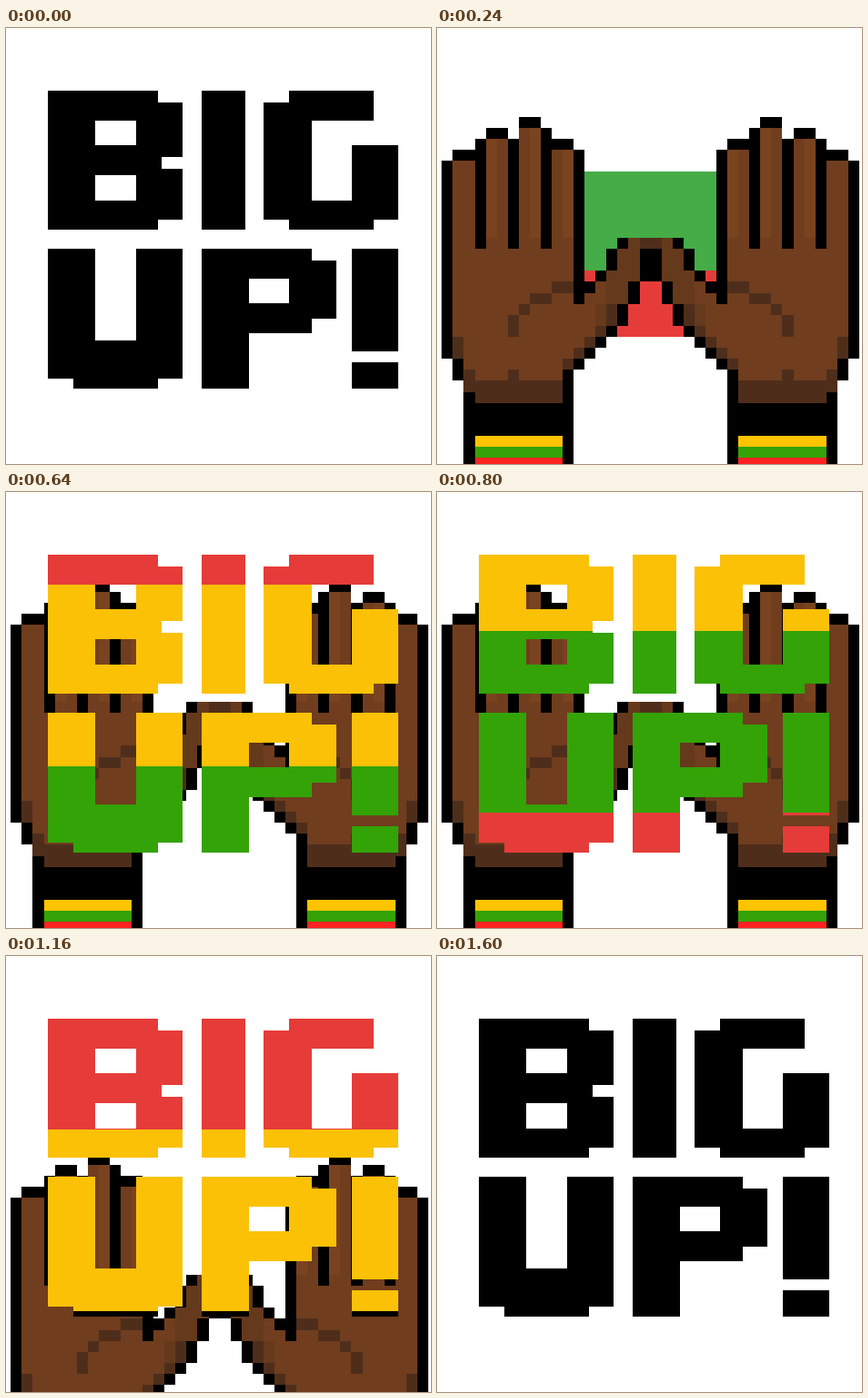
Animation of 467 by 480 pixels, one loop 1680 ms. Source, as an HTML page with a canvas:

```html
<!DOCTYPE html>
<html lang="en">
<head>
<meta charset="utf-8">
<title>Big up!</title>
<style>
  html, body { margin: 0; width: 100%; height: 100%; overflow: hidden; background: #fff; }
  canvas { display: block; }
</style>
</head>
<body>
<canvas id="stage" width="467" height="480"></canvas>
<script>
const ctx = document.getElementById('stage').getContext('2d');
const LOOP = 1680, W = 467, H = 480;

const BLACK = '#000', SKIN = '#703d1e', LIGHT = '#7a4320', MID = '#65391c', DARK = '#4e2e1b';
const YELLOW = '#fbc107', RED = '#e53c39', GREEN = '#33a307', SOFT_GREEN = '#45ac47';

// The picture holds for 80 ms, or 40 ms after the short steps
const SHORT = [0, 2, 7, 8, 13, 21];
const steps = [];
for (let t = 0, i = 0; t < LOOP; i++) {
  steps.push(t);
  t += SHORT.includes(i) ? 40 : 80;
}

// Value at t on the straight line through (t0, a) and (t1, b)
const line = (t, t0, a, t1, b) => Math.round(a + (b - a) * (t - t0) / (t1 - t0));

function stripeY(t) {
  if (t < 480) return line(t, 240, 467, 480, 261);
  if (t < 640) return line(t, 480, 261, 640, 102);
  if (t < 1000) return line(t, 640, 102, 1000, -233);
  return line(t, 1000, -233, 1320, -585);
}

function handsY(t) {
  return t < 240 ? line(t, 40, 240, 240, 0) : Math.max(0, line(t, 1080, 0, 1160, 120));
}

// A block with holes, each hole given relative to the block
function glyph(path, x, y, w, h, ...holes) {
  path.rect(x, y, w, h);
  for (const [dx, dy, hw, hh] of holes) path.rect(x + dx, y + dy, hw, hh);
}

// Corner notches of a full-width letter
const WIDE = 148, TALL = 153, CUT = 27;
const topLeft = [0, 0, CUT + 1, 13], topRight = [WIDE - CUT, 0, CUT, 13];
const lowLeft = [0, TALL - 11, CUT + 1, 11], lowRight = [WIDE - CUT, TALL - 11, CUT, 11];

function bigUp() {
  const p = new Path2D();
  glyph(p, 46, 69, WIDE, TALL, topRight, lowRight, [52, 33, 45, 27], [52, 93, 45, 28], [125, 73, 23, 13]);
  glyph(p, 215, 69, 48, TALL);
  glyph(p, 283, 69, WIDE, TALL, topLeft, topRight, lowLeft, lowRight,
    [53, 33, 44, 88], [97, 33, 51, 27], [121, 13, 27, 20]);
  glyph(p, 46, 244, WIDE, TALL, lowLeft, lowRight, [52, 0, 45, 100]);
  p.rect(46, 243, 52, 1);
  p.rect(143, 243, 51, 1);
  glyph(p, 215, 243, WIDE, 93, topRight, [52, 33, 44, 27], [121, 77, 27, 16]);
  glyph(p, 215, 336, 52, 61);
  glyph(p, 380, 243, 51, 154, [0, 113, 51, 12]);
  return p;
}

function risingWord() {
  const p = new Path2D();
  glyph(p, 46, 0, 153, 149, [116, 0, 37, 49], [48, 109, 44, 40]);
  glyph(p, 211, 0, 60, 149);
  glyph(p, 283, 0, 129, 149, [61, 109, 68, 40]);
  return p;
}

function band(top, end) {
  const p = new Path2D();
  p.rect(162, top, 145, end - top);
  return p;
}

const letters = bigUp(), blocks = risingWord();

function box(color, x0, y0, x1, y1) {
  ctx.fillStyle = color;
  ctx.fillRect(x0, y0, x1 - x0, y1 - y0);
}

// Fills a path with the scrolling stripes, black after the last one
function striped(path, shift, y, green = GREEN) {
  const colors = [YELLOW, green, RED];
  ctx.save();
  ctx.translate(0, shift);
  ctx.clip(path, 'evenodd');
  ctx.translate(0, -shift);
  for (let i = -6; i < 4; i++) box(colors[(i + 6) % 3], 0, y + i * 200, W, y + i * 200 + 200);
  box(BLACK, 0, y + 800, W, y + 2000);
  ctx.restore();
}

// Pixel cells, mirrored so that both hands are drawn
const gx = c => Math.round(5.3 + c * 12.07);
const gy = r => Math.round(97.66 + r * 12.115);
function cells(color, c0, r0, c1 = c0, r1 = r0) {
  box(color, gx(c0), gy(r0), gx(c1 + 1), gy(r1 + 1));
  box(color, gx(37 - c1), gy(r0), gx(38 - c0), gy(r1 + 1));
}

function fingers() {
  [4, 2, 1, 3].forEach((top, i) => {
    const c = 1 + i * 3;
    cells(BLACK, c, top - 1, c + 1);
    cells(SKIN, c, top, c + 1, 11);
    if (i) cells(LIGHT, i === 1 ? c : c + 1, top, i === 1 ? c : c + 1, 10);
  });
  [4, 2, 2, 1, 3].forEach((top, i) => cells(BLACK, i * 3, top, i * 3, 11));
}

// The thumb leans in along two stepped diagonals
function thumb() {
  for (let r = 11; r < 23; r++) {
    const left = r < 13 ? 27 - r : Math.max(11, 28 - r);
    const right = r < 12 ? 19 : Math.min(18 - Math.max(0, (r - 13) >> 1), 34 - r);
    cells(SKIN, left, r, right - 1);
    if (r < 17) {
      cells(MID, Math.max(15, left), r, right - 1);
      cells(BLACK, left, r);
    } else {
      cells(DARK, right - 1, r);
      if (r < 19) cells(MID, right - 2, r);
    }
    if (r > 11) cells(BLACK, right, r);
  }
  cells(DARK, 18, 11);
}

function hands() {
  fingers();
  cells(SKIN, 1, 12, 11, 21);
  cells(SKIN, 2, 22, 10, 23);
  cells(BLACK, 12, 12, 12, 15);
  thumb();
  // creases
  cells(DARK, 10, 15, 11);
  cells(DARK, 8, 16, 9);
  cells(DARK, 7, 17);
  cells(DARK, 6, 18, 6, 19);
  cells(DARK, 6, 23);
  cells(DARK, 1, 20, 1, 21);
  // wrist
  cells(DARK, 2, 23, 2, 24);
  cells(DARK, 3, 24, 10, 25);
  cells(BLACK, 0, 12, 0, 21);
  cells(BLACK, 1, 22, 1, 23);
  cells(BLACK, 2, 25, 2, 34);
  cells(BLACK, 11, 23, 11, 34);
  cells(BLACK, 3, 26, 10, 28);
  ['#ffc400', GREEN, '#ff2222'].forEach((color, i) => cells(color, 3, 29 + i, 10));
}

function rays() {
  const rayY = i => Math.round(25.4 + i * 24.25);
  box(BLACK, 227, 8, 238, 158);
  for (let i = 0; i < 6; i++) {
    const x = Math.round(143.2 + i * 12.07), y = rayY(i), end = Math.min(158, rayY(i + 1));
    box(BLACK, x, y, x + 12, end);
    box(BLACK, W - x - 12, y, W - x, end);
  }
}

function draw(t) {
  box('#fff', 0, 0, W, H);
  if (t < 40) {
    ctx.fillStyle = BLACK;
    ctx.fill(letters, 'evenodd');
    return;
  }
  const y = stripeY(t);
  if (t < 640) {
    striped(band(line(t, 240, 158, 480, -11), line(t, 240, 340, 480, 194)), 0, y, SOFT_GREEN);
  }
  if (t < 1240) {
    ctx.save();
    ctx.translate(0, handsY(t));
    hands();
    ctx.restore();
  }
  if (t >= 400 && t < 640) rays();
  const word = line(Math.min(t, 640), 480, 280, 640, 69);
  if (t < 520) striped(blocks, word, y);
  else striped(letters, word - 69, y);
}

function tick() {
  const now = performance.now() % LOOP;
  draw(steps.filter(s => s <= now).pop());
  requestAnimationFrame(tick);
}
tick();
</script>
</body>
</html>
```
